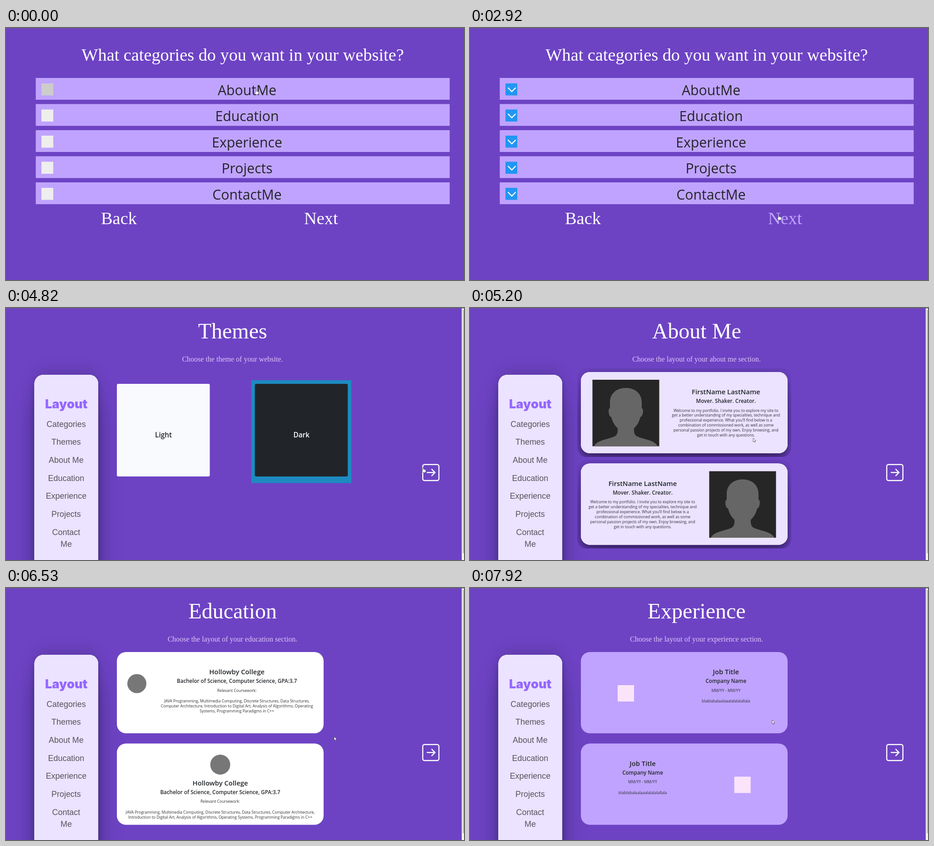
Write an HTML page with a canvas that moves like this. It is 1008x555 px and loops after 8000 ms.

```html
<!DOCTYPE html>
<html lang="en">
<head>
<meta charset="utf-8">
<title>Portfolio builder</title>
<style>
  html, body { margin: 0; width: 100%; height: 100%; overflow: hidden; background: #6d43c4; }
  canvas { display: block; }
</style>
</head>
<body>
<canvas width="1008" height="555"></canvas>
<script>
const ctx = document.querySelector('canvas').getContext('2d');
const LOOP = 8000, REFRESH = 120;
const PURPLE = '#6d43c4', LILAC = '#c0a3ff', PALE = '#ebe3ff', BLUE = '#1d8bc1', INK = '#212529';
const SERIF = '"Liberation Serif", "Times New Roman", serif';
const SANS = '"Liberation Sans", Arial, sans-serif';
const UI = '"Open Sans", "Noto Sans", sans-serif';

const ROWS = ['AboutMe', 'Education', 'Experience', 'Projects', 'ContactMe'];
const CHECKED_AT = [120, 520, 1240, 1980, 2370];
const MENU = ['Categories', 'Themes', 'About Me', 'Education', 'Experience', 'Projects', 'Contact'];
const INTRO = [
  'Welcome to my portfolio. I invite you to explore my site to',
  'get a better understanding of my specialties, technique and',
  'professional experience. What you’ll find below is a',
  'combination of commissioned work, as well as some',
  'personal passion projects of my own. Enjoy browsing, and',
  'get in touch with any questions.'
];
const COURSES_NARROW = [
  'JAVA Programming, Multimedia Computing, Discrete Structures, Data Structures,',
  'Computer Architecture, Introduction to Digital Art, Analysis of Algorithms, Operating',
  'Systems, Programming Paradigms in C++'
];
const COURSES_WIDE = [
  'JAVA Programming, Multimedia Computing, Discrete Structures, Data Structures, Computer Architecture,',
  'Introduction to Digital Art, Analysis of Algorithms, Operating Systems, Programming Paradigms in C++'
];
const SECOND = 201.5; // offset of the lower card

// When each screen opens and when its choice is made
const THEMES = { open: 3070, pick: 4220 };
const ABOUT = { open: 5080, pick: 5710 };
const EDUCATION = { open: 6530, pick: 6920 };
const EXPERIENCE = { open: 7680 };

// Places where the pointer rests
const stop = (x, y, arrive, leave = arrive) => ({ x, y, arrive, leave });
const STOPS = [
  ...CHECKED_AT.map((at, i) => stop(550 - 10 * i, 135 + 54 * i, at)),
  stop(686, 415, 2920),
  stop(676, 410, 3190, 3440),
  stop(541, 250, 3820, THEMES.pick),
  stop(918, 351, 4820, ABOUT.open),
  stop(525, 265, 5560, ABOUT.pick),
  stop(920, 357, 6280, EDUCATION.open),
  stop(540, 300, EDUCATION.pick),
  stop(934, 357, 7400, EXPERIENCE.open),
  stop(665, 291, 7920, LOOP)
];

// Eases out from stop to stop, moving once per refresh
function pointerAt(t) {
  const i = STOPS.findLastIndex(s => t >= s.leave);
  const from = STOPS[i], to = STOPS[i + 1];
  if (!from || t >= to.arrive) return to;
  const elapsed = (Math.floor((t - from.leave) / REFRESH) + 1) * REFRESH;
  const left = 1 - Math.min(1, elapsed / (to.arrive - from.leave));
  const k = 1 - left * left;
  return { x: from.x + (to.x - from.x) * k, y: from.y + (to.y - from.y) * k };
}

function rect(x, y, w, h, color, r = 0) {
  ctx.beginPath();
  ctx.roundRect(x, y, w, h, r);
  ctx.fillStyle = color;
  ctx.fill();
}

function text(str, x, y, font, color, align = 'center') {
  ctx.font = font;
  ctx.fillStyle = color;
  ctx.textAlign = align;
  ctx.fillText(str, x, y);
}

function line(points, width) {
  ctx.beginPath();
  points.forEach(([x, y]) => ctx.lineTo(x, y));
  ctx.lineWidth = width;
  ctx.strokeStyle = '#fff';
  ctx.stroke();
}

function disc(x, y, r, color) {
  rect(x - r, y - r, 2 * r, 2 * r, color, r);
}

// Layered shadow: a wide soft one far below, tighter ones near the edge
function shadowed(draw) {
  ctx.save();
  [[54, 55, .25], [-12, 30, .12], [12, 13, .17], [4, 6, .12]].forEach(([dy, blur, alpha]) => {
    ctx.shadowColor = `rgba(0,0,0,${alpha})`;
    ctx.shadowBlur = blur;
    ctx.shadowOffsetY = dy;
    draw();
  });
  ctx.restore();
}

const ARROW = new Path2D('M0 0V8.3L1.9 6.6L3.2 9.3L4.6 8.7L3.4 6H6Z');
const HAND = new Path2D('M-1 .8Q0-.3 1 .8V4.2Q2.2 3.6 3 4.6Q4.2 4.1 4.7 5.1Q6.2 4.8 6.2 6.2V8.6L5 11.4H-.4L-3 7.6Q-3.2 5.9-1 7.4Z');

function drawPointer({ x, y }, hand) {
  const shape = hand ? HAND : ARROW;
  ctx.save();
  ctx.translate(x, y);
  ctx.fillStyle = '#fff';
  ctx.fill(shape);
  ctx.lineWidth = .7;
  ctx.strokeStyle = '#333';
  ctx.stroke(shape);
  ctx.restore();
}

function categories(t, pointer) {
  text('What categories do you want in your website?', 521, 72, '38.3px ' + SERIF, '#fff');
  ROWS.forEach((name, i) => {
    const y = 110 + 57.5 * i, checked = t >= CHECKED_AT[i];
    const hover = pointer.y >= y && pointer.y < y + 48;
    rect(65.5, y, 911, 48, LILAC);
    rect(78, y + 12, 26, 26.5, checked ? '#2196f3' : hover ? '#ccc' : '#eee');
    if (checked) line([[83.5, y + 21.5], [92, y + 30], [100.5, y + 21.5]], 2.4);
    text(name, 530.5, y + 37.5, '30.2px ' + UI, INK);
  });
  text('Back', 209, 432, '38.4px ' + SERIF, '#fff', 'left');
  text('Next', 656, 432, '38.4px ' + SERIF, t >= 2920 ? LILAC : '#fff', 'left');
}

function frame(title, subtitle) {
  text(title, 498.7, 67, '48px ' + SERIF, '#fff');
  text(subtitle, 498.5, 118, '16px ' + SERIF, '#dfc6f7');
  shadowed(() => rect(62.5, 147, 140.5, 500, PALE, 20));
  text('Layout', 132.7, 220.5, '900 27.2px Inter, sans-serif', '#9466ff');
  MENU.forEach((name, i) => text(name, 132.4, 261.5 + 39.67 * i, '17.9px ' + SANS, '#57535c'));
  text('Me', 132.4, 526, '17.9px ' + SANS, '#57535c');

  ctx.beginPath();
  ctx.roundRect(917.2, 344.7, 35.6, 35.3, 4);
  ctx.lineWidth = 2.4;
  ctx.strokeStyle = '#fff';
  ctx.stroke();
  line([[926, 362.3], [943.5, 362.3]], 2.4);
  line([[936.5, 354.5], [944, 362.3], [936.5, 370]], 2.4);

  rect(1003, 1, 5, 554, '#f1f1f1');
  rect(1005, 4, 3, 536, '#c1c1c1');
}

function card(y, color, selected, shade) {
  ctx.save();
  ctx.beginPath();
  ctx.roundRect(236, y - 8, 471, 195, 20);
  if (selected) {
    ctx.fillStyle = BLUE;
    ctx.fill();
  }
  ctx.clip();
  const body = () => rect(244, y, 455, 179, color, 20);
  shade ? shadowed(body) : body();
  ctx.restore();
}

function lines(list, x, y) {
  list.forEach((s, i) => text(s, x, y + 10.95 * i, '8.6px ' + UI, '#303036'));
}

function headings(name, detail, x, y) {
  text(name, x, y + 190, '600 14.8px ' + UI, INK);
  text(detail, x, y + 209.3, '600 11.6px ' + UI, INK);
}

const HALF_FIGURE = new Path2D('M-.5 18H0C20 18 35 30 35 50V63C40 62 38 82 32 82C29 95 23 102 18 107Q17 118 22 123C34 131 64 132 70 146.5H-.5Z');

function portrait(x, y) {
  rect(x, y, 147, 146.5, '#262626');
  for (const side of [-1, 1]) {
    ctx.save();
    ctx.translate(x + 73.5, y);
    ctx.scale(side, 1);
    ctx.fillStyle = '#666';
    ctx.fill(HALF_FIGURE);
    ctx.restore();
  }
}

function themes(t) {
  frame('Themes', 'Choose the theme of your website.');
  if (t >= THEMES.pick) rect(540, 159, 220, 226.5, BLUE);
  rect(244, 167, 204.5, 204, '#f8fafd', 3);
  rect(547.7, 167, 204.5, 204, INK, 3);
  text('Light', 346.5, 285, '600 15.3px ' + UI, INK);
  text('Dark', 650.2, 285, '600 15.3px ' + UI, '#fff');
}

function aboutMe(t) {
  frame('About Me', 'Choose the layout of your about me section.');
  const option = (dy, photoX, x, selected) => {
    card(141 + dy, PALE, selected, true);
    portrait(photoX, 158 + dy);
    headings('FirstName LastName', 'Mover. Shaker. Creator.', x, dy);
    lines(INTRO, x, 228.5 + dy);
  };
  option(0, 269.5, 563.3, t >= ABOUT.pick);
  option(SECOND, 526.5, 380);
}

function education(t) {
  frame('Education', 'Choose the layout of your education section.');
  const option = (dy, x, courses) => {
    headings('Hollowby College', 'Bachelor of Science, Computer Science, GPA:3.7', x, dy);
    lines(['Relevant Coursework:'], x, 228.5 + dy);
    lines(courses, x, 252.3 + dy);
  };
  card(141, '#fff', t >= EDUCATION.pick);
  card(141 + SECOND, '#fff');
  disc(288, 210.5, 21, '#777');
  disc(471.5, 389, 22, '#777');
  option(0, 508.2, COURSES_NARROW);
  option(244.5, 471.5, COURSES_WIDE);
}

function experience() {
  frame('Experience', 'Choose the layout of your experience section.');
  const option = (dy, logoX, x) => {
    card(141 + dy, LILAC);
    rect(logoX - 18, 214 + dy, 36, 36, '#fbe4fa');
    headings('Job Title', 'Company Name', x, dy);
    lines(['MM/YY - MM/YY'], x, 228.5 + dy);
    lines(['blablabalaalaaalalalalallala'], x, 252.3 + dy);
  };
  option(0, 343, 563.3);
  option(SECOND, 599.7, 380);
}

function pageAt(t) {
  if (t >= EXPERIENCE.open) return experience;
  if (t >= EDUCATION.open) return education;
  if (t >= ABOUT.open) return aboutMe;
  return t >= THEMES.open ? themes : categories;
}

function draw(t) {
  const pointer = pointerAt(t), page = pageAt(t);
  rect(0, 0, 1008, 555, PURPLE);
  page(t, pointer);
  rect(0, 0, 1008, 1, '#6b5a93');
  drawPointer(pointer, page === categories || pointer.x > 914);
}

const start = performance.now();
function tick() {
  draw((performance.now() - start) % LOOP);
  requestAnimationFrame(tick);
}
tick();
</script>
</body>
</html>
```
